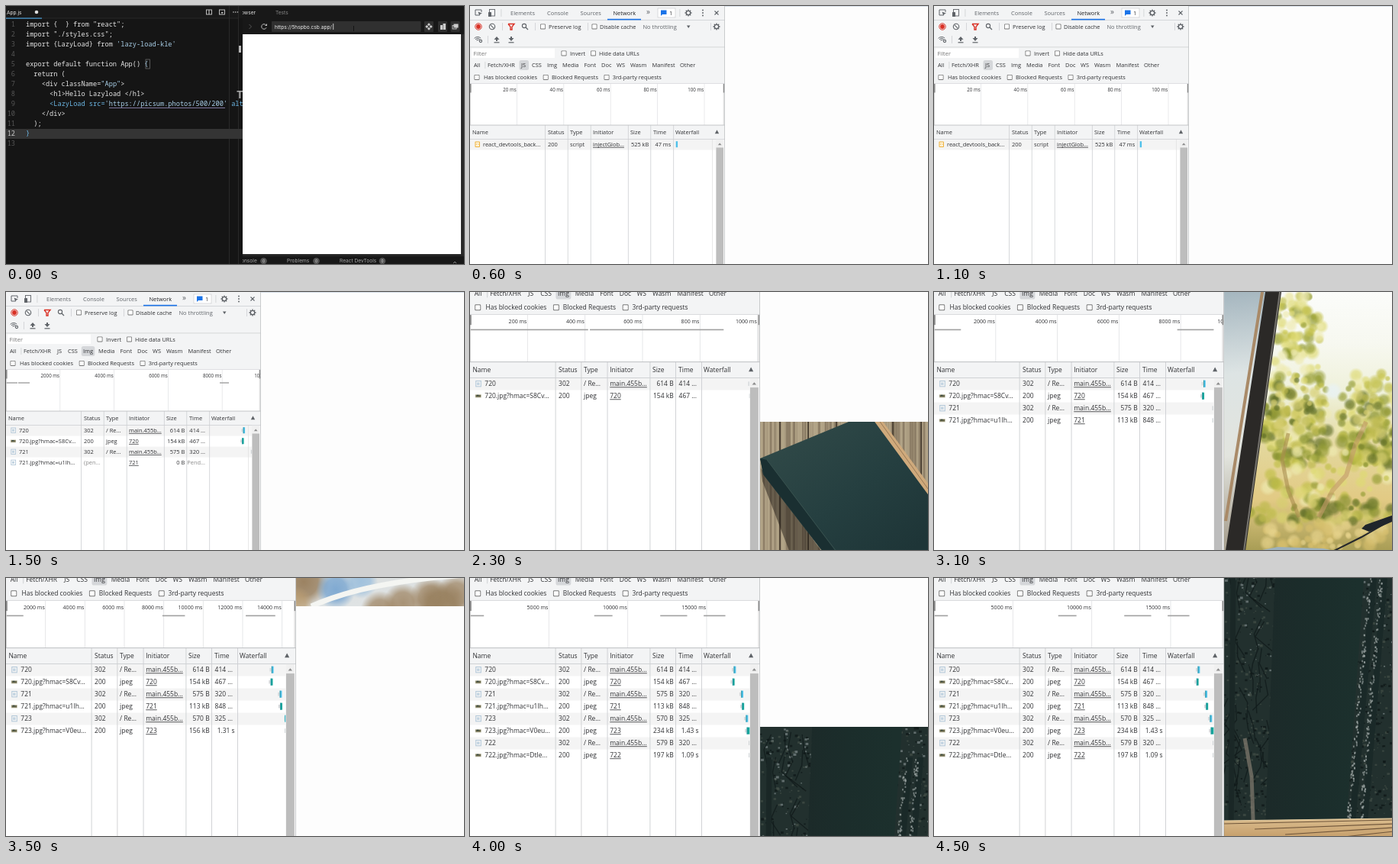
An HTML page with a canvas for the animation above (4600 ms loop, 600 px wide and 338 px high).

```html
<!DOCTYPE html>
<html lang="en">
<head>
<meta charset="utf-8">
<title>Lazy loading demo</title>
<style>
html, body { margin: 0; width: 100%; height: 100%; overflow: hidden; background: #fff; }
canvas { display: block; width: 600px; height: 338px; }
</style>
</head>
<body>
<canvas id="c" width="600" height="338"></canvas>
<script>
const ctx = document.getElementById('c').getContext('2d');
const LOOP = 4600, STEP = 100, W = 600, H = 338;
const UI = '7.45px "Open Sans", "Noto Sans", sans-serif';
const RULER = '6.2px "Open Sans", "Noto Sans", sans-serif';
const MONO = '8.64px "Noto Sans Mono", "DejaVu Sans Mono", monospace';
const SANS = '6.6px Inter, Roboto, sans-serif';

// ---------- helpers ----------
function rect(x, y, w, h, color) {
  ctx.fillStyle = color;
  ctx.fillRect(x, y, w, h);
}
function round(x, y, w, h, r, color) {
  ctx.fillStyle = color;
  ctx.beginPath();
  ctx.roundRect(x, y, w, h, r);
  ctx.fill();
}
function line(pts, color, width = 1) {
  ctx.strokeStyle = color;
  ctx.lineWidth = width;
  ctx.beginPath();
  for (let i = 0; i < pts.length; i += 2) ctx.lineTo(pts[i], pts[i + 1]);
  ctx.stroke();
}
function poly(pts, color) {
  ctx.fillStyle = color;
  ctx.beginPath();
  for (let i = 0; i < pts.length; i += 2) ctx.lineTo(pts[i], pts[i + 1]);
  ctx.fill();
}
function ring(x, y, r, color, width = 1) {
  ctx.strokeStyle = color;
  ctx.lineWidth = width;
  ctx.beginPath();
  ctx.arc(x, y, r, 0, 7);
  ctx.stroke();
}
function disc(x, y, r, color) {
  ctx.fillStyle = color;
  ctx.beginPath();
  ctx.arc(x, y, r, 0, 7);
  ctx.fill();
}
function box(x, y, w, h, color, width = 0.9) {
  ctx.strokeStyle = color;
  ctx.lineWidth = width;
  ctx.strokeRect(x, y, w, h);
}
// y is the middle of the capitals
function text(s, x, y, color = '#303134', font = UI, align = 'left') {
  ctx.font = font;
  ctx.textAlign = align;
  ctx.fillStyle = color;
  ctx.fillText(s, x, y + 2.7);
  return ctx.measureText(s).width;
}
function blob(x, y, r, rgb, a) {
  const g = ctx.createRadialGradient(x, y, 0, x, y, r);
  g.addColorStop(0, `rgba(${rgb},${a})`);
  g.addColorStop(0.55, `rgba(${rgb},${a * 0.85})`);
  g.addColorStop(1, `rgba(${rgb},0)`);
  ctx.fillStyle = g;
  ctx.fillRect(x - r, y - r, 2 * r, 2 * r);
}
function fade(x0, y0, x1, y1, ...colors) {
  const g = ctx.createLinearGradient(x0, y0, x1, y1);
  colors.forEach((c, i) => g.addColorStop(i / (colors.length - 1), c));
  return g;
}
function seeded(n) {
  return () => (n = (n * 16807) % 2147483647) / 2147483647;
}
function track(keys, t) {
  let i = 0;
  while (i < keys.length - 2 && t > keys[i + 1][0]) i++;
  const [t0, a] = keys[i], [t1, b] = keys[i + 1];
  const k = Math.min(1, Math.max(0, (t - t0) / (t1 - t0)));
  return a + (b - a) * k;
}
function clipped(x, y, w, h, draw) {
  ctx.save();
  ctx.beginPath();
  ctx.rect(x, y, w, h);
  ctx.clip();
  draw();
  ctx.restore();
}

// ---------- code editor ----------
const WHITE = '#e6e6e6', BLUE = '#6cb8e6', PALE = '#a9cfe8';
const CODE = [
  [0, 'import {  } from "react";', WHITE],
  [0, 'import "./styles.css";', WHITE],
  [0, 'import {LazyLoad} from ', WHITE, "'lazy-load-kle'", PALE],
  [0, ''],
  [0, 'export default function App() ', WHITE, '{', PALE],
  [2, 'return (', WHITE],
  [4, '<div className=', WHITE, '"App"', PALE, '>', WHITE],
  [6, '<h1>Hello Lazyload </h1>', WHITE],
  [6, '<LazyLoad src=', BLUE, "'https://picsum.photos/500/200'", PALE, ' alt=', BLUE],
  [4, '</div>', WHITE],
  [2, ');', WHITE],
  [0, '}', BLUE],
  [0, '']
];
function editor() {
  rect(0, 0, W, H, '#151515');
  rect(0, 0, 310, 16, '#191919');
  rect(0, 15.5, 305, 1, '#292929');
  rect(0, 15.5, 47, 1.2, '#4a9fd8');
  text('App.js', 1, 8, WHITE, SANS);
  disc(40, 8, 2.3, '#ddd');
  rect(292, 0, 1, H, '#292929');
  rect(304, 0, 1, H, '#292929');
  rect(0, 161, 310, 13, '#343434');
  box(183, 70, 5.5, 12, '#777', 0.7);
  clipped(0, 16, 310, H, () => {
    CODE.forEach((row, i) => {
      const y = 24 + i * 13.05;
      text(i + 1, 12, y, i === 11 ? '#ccc' : '#555', MONO, 'right');
      let x = 26 + row[0] * 5.184;
      for (let k = 1; k < row.length; k += 2) x += text(row[k], x, y, row[k + 1], MONO);
    });
    rect(135, 133, 152, 0.8, '#9a91c4');
  });
  box(262.5, 5, 7, 6, '#ccc');
  line([266, 5, 266, 11], '#ccc');
  box(279.5, 5, 7, 6, '#ccc');
  poly([281.5, 8, 285, 8, 283, 10], '#ccc');
  for (let i = 0; i < 3; i++) disc(298 + i * 2.7, 8, 0.8, '#ccc');
  round(305, 52, 3, 9, 0, '#b8b8b8');
  text('T', 302, 118, '#aaa', 'bold 13px Inter, sans-serif');

  rect(310, 0, 290, H, '#181818');
  clipped(310, 0, 290, H, () => {
    text('Browser', 327, 8, WHITE, SANS, 'right');
    text('onsole', 308, 333.5, '#aaa', SANS);
  });
  text('Tests', 353, 8, '#888', SANS);
  line([318.5, 24, 321.5, 27, 318.5, 30], '#555');
  ctx.strokeStyle = '#bbb';
  ctx.beginPath();
  ctx.arc(338, 27, 3.3, 0.4, 5.5);
  ctx.stroke();
  poly([339, 26, 342, 26, 342, 23], '#bbb');
  round(348, 20, 195.5, 14, 1, '#303030');
  text('https://5hspbo.csb.app/', 352, 27, '#f0f0f0', SANS);
  rect(428.4, 23, 0.8, 8, '#eee');
  line([455.5, 26, 455.5, 33], '#111', 0.9);
  [554, 572, 588.5].forEach(x => round(x - 6, 20, 12, 14, 1, '#303030'));
  [[0, -2.7], [0, 2.7], [-2.7, 0], [2.7, 0]].forEach(([x, y]) => {
    const a = 554 + x, b = 27 + y;
    poly([a, b - 2, a + 2, b, a, b + 2, a - 2, b], '#ccc');
  });
  rect(569, 25, 3, 6, '#ccc');
  rect(572.5, 23, 3.5, 8, '#ccc');
  rect(586.5, 23.5, 6, 5, '#ccc');
  box(585, 25.5, 5, 4.5, '#ccc');
  rect(310, 37, 286, 288, '#fff');
  rect(596, 37, 4, 288, '#2a2a2a');
  rect(310, 325, 290, 3, '#262626');
  text('Problems', 368, 333.5, '#aaa', SANS);
  text('React DevTools', 437, 333.5, '#aaa', SANS);
  [337.5, 406.5, 493].forEach(x => {
    disc(x, 334, 4.3, '#555');
    text('0', x, 333.7, '#ddd', '5px Inter, sans-serif', 'center');
  });
  line([586, 337, 588, 335, 590, 337], '#aaa', 0.8);
}

// ---------- photos, local to their top left corner ----------
const PHOTO_H = 440;
function book(w) {
  const rnd = seeded(11);
  rect(0, 0, w, PHOTO_H, '#a5967c');
  for (let x = -20; x < w; x += 3) {
    rect(x, 0, 1 + rnd() * 2, PHOTO_H, rnd() < 0.5 ? 'rgba(75,62,45,.28)' : 'rgba(220,205,170,.25)');
  }
  for (let x = 25; x < w; x += 37) rect(x, 0, 2, PHOTO_H, '#4d4234');
  poly([1, 61, 20, 85, 90, 183, 215, PHOTO_H, 50, 200, 3, 78], 'rgba(35,28,22,.5)');
  poly([150, 0, 161, 0, 250, 122, 320, 220, 300, 240], '#cfaa7c');
  line([157, 0, 250, 130], '#8b6c4c', 0.8);
  poly([0, 48, 116, 0, 150, 0, 222, 98, 300, 205, 120, 330, 88, 178, 4, 69],
    fade(40, 20, 170, 190, '#2f4847', '#253f40', '#1e3537'));
  poly([0, 48, 9, 50, 105, 178, 84, 172, 4, 69], '#1a2f31');
  line([9, 50, 106, 178], '#38514e', 1);
}
function windscreen(w) {
  const rnd = seeded(5);
  const leaves = (n, x, y, rx, ry, tones) => {
    for (let i = 0; i < n; i++) {
      const a = rnd() * 6.3, d = Math.sqrt(rnd());
      blob(x + Math.cos(a) * rx * d, y + Math.sin(a) * ry * d, 4 + rnd() * 7, tones[i % tones.length], 0.75);
    }
  };
  const LIT = ['222,218,116', '194,192,74', '150,158,54', '238,234,176'];
  const DEEP = ['134,144,48', '98,112,40', '190,186,78', '214,206,112'];
  ctx.fillStyle = fade(0, 50, 0, 390, '#fbfcfa', '#f7f8f0', '#eef0d8', '#e3d79c', '#e2ca84', '#a79c54');
  ctx.fillRect(0, 0, w, PHOTO_H);
  leaves(60, 100, 95, 34, 45, LIT);
  leaves(110, 85, 195, 52, 75, LIT);
  leaves(90, 92, 225, 45, 60, DEEP);
  leaves(120, 192, 215, 42, 65, LIT);
  leaves(70, 190, 235, 40, 55, DEEP);
  leaves(60, 130, 290, 90, 35, LIT);
  leaves(70, 130, 340, 100, 18, DEEP);
  leaves(45, 135, 370, 95, 16, ['232,212,140', '214,190,108']);
  blob(143, 180, 12, '232,242,246', 0.8);
  line([124, 345, 142, 310, 160, 290, 172, 250, 186, 220], 'rgba(196,156,104,.6)', 6);
  line([98, 345, 84, 310, 76, 270, 84, 235], 'rgba(168,140,78,.6)', 5);
  poly([0, 0, 66, 0, 60, 50, 5, 388, 0, PHOTO_H], fade(0, 50, 30, 370, '#a5b6bf', '#dde4e4', '#e2e4de', '#aaa394'));
  line([50, 50, 2, 350], '#a98a68', 4);
  poly([70, 0, 80, 0, 75, 50, 28, 388, 24, PHOTO_H, 0, PHOTO_H, 2, 388, 54, 50], '#2b2927');
  line([73, 50, 26, 388], '#75736d', 2);
  poly([40, 390, 70, 384, 130, 386, 150, 390], '#9db1bc');
  line([142, 390, 180, 371, 222, 347], '#24272b', 2);
  poly([180, 360, 185, 355, 222, 342, 222, 350, 190, 364], '#20252b');
}
function chrome(w) {
  ctx.fillStyle = fade(0, 0, 0, PHOTO_H, '#b9c8d2', '#6f8ca4', '#d6d8d6', '#dfe3e4');
  ctx.fillRect(0, 0, w, PHOTO_H);
  blob(10, 408, 34, '148,120,84', 0.9);
  blob(0, 436, 22, '186,156,112', 0.8);
  blob(52, 418, 26, '118,164,208', 0.9);
  blob(85, 408, 22, '146,186,220', 0.8);
  [[110, 446], [140, 436], [175, 428], [210, 424]].forEach(([x, y]) => blob(x, y, 26, '158,132,98', 0.85));
  blob(190, 440, 34, '150,126,92', 0.9);
  ctx.beginPath();
  ctx.moveTo(20, 440);
  ctx.quadraticCurveTo(90, 408, 222, 399);
  ctx.strokeStyle = '#f4f5f2';
  ctx.lineWidth = 7;
  ctx.stroke();
}
function forest(w) {
  const rnd = seeded(23);
  rect(0, 0, w, PHOTO_H, '#22302e');
  for (let i = 0; i < 1500; i++) {
    const x = rnd() * w, y = rnd() * 350, size = 1 + rnd() * 3;
    const sky = rnd() < 0.5 - y / 500;
    rect(x, y, size, size * 0.8, sky ? 'rgba(138,150,152,.6)' : ['rgba(14,22,22,.7)', 'rgba(72,84,76,.6)'][i % 2]);
  }
  for (let i = 0; i < 40; i++) {
    const x = rnd() * 75, y = rnd() * 300;
    line([x, y, x + 12 - rnd() * 24, y + 20, x + 18 - rnd() * 36, y + 40], 'rgba(18,27,27,.8)', 1.4);
  }
  line([12, 40, 9, 365], '#1a2726', 7);
  line([27, 250, 36, 300, 38, 358], 'rgba(132,124,112,.7)', 5);
  poly([68, 0, 186, 0, 160, 365, 54, 365], fade(55, 0, 175, 0, '#1c2a29', '#1b2d2b', '#1c302d'));
  [[188, 160], [202, 176]].forEach(([top, foot]) => {
    line([top + 8, 40, foot + 8, 360], '#1a2928', 8);
    for (let k = 0; k < 130; k++) {
      const p = rnd();
      rect(top + (foot - top) * p + rnd() * 5, 40 + p * 315, 1.8, 2.5, 'rgba(172,180,178,.6)');
    }
  });
  poly([0, 358, 222, 355, 222, PHOTO_H, 0, PHOTO_H], fade(0, 356, 0, 382, '#d9bb8c', '#c49c68'));
  [0, 1, 2, 3].forEach(i => line([i * 40, 362 + i * 7, 222, 357 + i * 5], '#6f553a', 1.1));
  line([0, 358, 222, 355], '#e6cfa4', 1);
}
const PHOTOS = [book, windscreen, chrome, forest];
const SCROLL = [[1700, -338], [2300, -170], [2700, 470], [3100, 890], [3500, 2083],
  [3800, 2150], [4200, 2500], [4500, 2560]];

function page(left, scroll) {
  rect(left, 0, W - left, H, '#fdfdfd');
  PHOTOS.forEach((draw, i) => {
    const y = i * 840 - scroll;
    if (y > H || y + PHOTO_H < 0) return;
    clipped(left, y, W - left, PHOTO_H, () => {
      ctx.translate(left, y);
      draw(W - left);
    });
  });
}

// ---------- network panel ----------
const SCRIPT = [['react_devtools_back...', '200', 'script', 'injectGlob...', '525 kB', '47 ms']];
function redirect(id, size, time) {
  return [id, '302', '/ Re...', 'main.455b...', size, time];
}
function picture(id, hash, size, time) {
  return [`${id}.jpg?hmac=${hash}...`, '200', 'jpeg', id, size, time];
}
const IMAGES = [
  redirect('720', '614 B', '414 ...'), picture('720', 'S8Cv', '154 kB', '467 ...'),
  redirect('721', '575 B', '320 ...'), picture('721', 'u1Ih', '113 kB', '848 ...'),
  redirect('723', '570 B', '325 ...'), picture('723', 'V0eu', '156 kB', '1.31 s'),
  redirect('722', '579 B', '320 ...'), picture('722', 'Dtle', '197 kB', '1.09 s')
];
const PENDING = ['721.jpg?hmac=u1Ih...', '(pen...', '', '721', '0 B', 'Pend...'];
const FINAL = IMAGES.slice();
FINAL[5] = picture('723', 'V0eu', '234 kB', '1.43 s');

// from: start time, tick: ms per mark, gap: px per mark, bars: overview, falls: waterfall x
const FIRST = { rows: IMAGES.slice(0, 2), tick: 200, gap: 66.2, bars: [[0, 136], [138, 292]], falls: [321, 322] };
const WAIT = { rows: [...IMAGES.slice(0, 3), PENDING], tick: 2000, gap: 70.8,
  bars: [[0, 15], [16, 31], [280, 292]], falls: [311, 309.5, 321.5] };
const STATES = [
  { from: 0, rows: SCRIPT, tick: 20, gap: 61.4, bars: [], falls: [270], js: true },
  { from: 1300, ...FIRST },
  { from: 1400, ...WAIT },
  { from: 1700, ...FIRST },
  { from: 2700, ...WAIT },
  { from: 2900, rows: IMAGES.slice(0, 4), tick: 2000, gap: 71, bars: [[0, 31], [280, 322]],
    falls: [310.5, 309, 321, 321] },
  { from: 3400, rows: IMAGES.slice(0, 6), tick: 2000, gap: 45.4, bars: [[0, 20], [180, 206], [276, 310]],
    falls: [306, 305, 315.5, 316, 321, 321.5] },
  { from: 4000, rows: FINAL, tick: 5000, gap: 90.8, bars: [[0, 16], [143, 164], [219, 250], [269, 294]],
    falls: [304, 302.5, 312.5, 313.5, 318, 319, 321.5, 321.5] }
];
const TYPES = [['All', 5], ['Fetch/XHR', 23], ['JS', 67], ['CSS', 81], ['Img', 101], ['Media', 121],
  ['Font', 149.5], ['Doc', 172], ['WS', 192], ['Wasm', 210], ['Manifest', 238.5], ['Other', 275]];
const GRAY = '#5f6368', RULE = '#cdcfd2';

function check(x, y, label, at) {
  round(x, y - 3.6, 7, 7, 1.2, '#777');
  round(x + 0.8, y - 2.8, 5.4, 5.4, 0.7, '#fff');
  text(label, at, y);
}
function gear(x, y) {
  ring(x, y, 2.7, GRAY, 1.3);
  for (let a = 0; a < 8; a++) {
    const c = Math.cos(a * Math.PI / 4), s = Math.sin(a * Math.PI / 4);
    line([x + c * 3, y + s * 3, x + c * 4.5, y + s * 4.5], GRAY, 1.3);
  }
}
function toolbar(js) {
  rect(0, 0, 334, 101.5, '#f3f4f5');
  [18, 53.5, 101].forEach(y => rect(0, y, 334, 0.8, RULE));
  // tabs
  line([12, 12, 7, 12, 7, 5, 15, 5, 15, 8], GRAY);
  poly([10.5, 7.5, 16, 9.8, 13.5, 10.5, 12.5, 13], GRAY);
  box(25.5, 4.5, 7, 8.5, GRAY);
  round(24, 8, 4, 6, 0.5, GRAY);
  rect(40.5, 4, 0.8, 10, RULE);
  [['Elements', 53], ['Console', 101], ['Sources', 144.5], ['Network', 187.5]]
    .forEach(([s, x]) => text(s, x, 9, x > 180 ? '#202124' : GRAY));
  rect(180, 16.8, 44, 1.6, '#1a73e8');
  text('»', 231, 8.5, GRAY, '10px "Open Sans", sans-serif');
  round(246, 3, 23, 12, 2, '#fff');
  box(246, 3, 23, 12, RULE, 0.7);
  poly([250, 5.5, 257.5, 5.5, 257.5, 11, 252, 11, 250, 13], '#1a73e8');
  text('1', 261, 9);
  rect(274.5, 4, 0.8, 10, RULE);
  gear(286, 9);
  [5.5, 9, 12.5].forEach(y => disc(305, y, 0.95, GRAY));
  line([320.5, 6.5, 325.5, 11.5], GRAY, 1.1);
  line([325.5, 6.5, 320.5, 11.5], GRAY, 1.1);
  // record row
  ring(11, 27, 4.2, '#d93025');
  disc(11, 27, 2.9, '#d93025');
  ring(29, 27, 3.7, GRAY, 1.1);
  line([26.4, 24.4, 31.6, 29.6], GRAY, 1.1);
  [42, 85, 154, 315].forEach(x => rect(x, 22, 0.8, 10, RULE));
  line([50, 23.5, 58, 23.5, 55, 27.2, 55, 31, 53, 31, 53, 27.2, 50, 23.5], '#d93025', 1.4);
  ring(71, 26, 2.6, GRAY, 1.1);
  line([73, 28, 76, 31], GRAY, 1.2);
  check(92, 27, 'Preserve log', 103);
  check(159.5, 27, 'Disable cache', 170);
  text('No throttling', 226.5, 27, GRAY);
  poly([284, 25.5, 288.5, 25.5, 286.2, 29], GRAY);
  gear(323, 27);
  // conditions row
  [2, 4, 6].forEach(r => {
    ctx.strokeStyle = GRAY;
    ctx.lineWidth = 1;
    ctx.beginPath();
    ctx.arc(10, 46.5, r, 3.9, 5.5);
    ctx.stroke();
  });
  ring(14, 46, 1.6, GRAY, 1.1);
  rect(23, 39, 0.8, 10, RULE);
  poly([35, 40, 38.5, 44, 36, 44, 36, 46, 34, 46, 34, 44, 31.5, 44], GRAY);
  poly([54, 46, 57.5, 42, 55, 42, 55, 40, 53, 40, 53, 42, 50.5, 42], GRAY);
  [35, 54].forEach(x => rect(x - 3.5, 47.2, 7, 1.2, GRAY));
  // filter rows
  rect(2, 55.5, 109, 12.5, '#fff');
  text('Filter', 4.5, 62, '#757575');
  check(119.5, 62, 'Invert', 131);
  check(158, 62, 'Hide data URLs', 169);
  if (js) round(64.5, 71, 12.5, 13, 2.5, '#d5d7da');
  else round(98.8, 71, 17.5, 13, 2.5, '#d5d7da');
  TYPES.forEach(([s, x]) => text(s, x, 77.5));
  rect(19.5, 73, 0.8, 9, RULE);
  check(5.5, 93.5, 'Has blocked cookies', 18);
  check(95.7, 93.5, 'Blocked Requests', 107);
  check(175.5, 93.5, '3rd-party requests', 186.7);
}
function overview(s) {
  rect(0, 101.8, 334, 54, '#fff');
  for (let i = 1; i * s.gap < 360; i++) {
    const x = i * s.gap;
    rect(x - 0.4, 102, 0.8, 54, '#e3e4e6');
    text(i * s.tick + ' ms', x - 0.8, 108.8, '#303134', RULER, 'right');
  }
  s.bars.forEach(([a, b]) => rect(a, 118.3, b - a, 1.4, '#a0a0a0'));
  [0, 331.8].forEach(x => {
    rect(x, 102, 0.8, 54, '#ccc');
    rect(x, 102, 1.6, 11.5, '#8a8a8a');
  });
}
function icon(type, y) {
  if (type === 'jpeg') {
    rect(6, y - 1.9, 7, 4, '#d6d4c4');
    rect(6.5, y - 1.2, 6, 2.5, '#6c6a4c');
    rect(8, y - 1.2, 2, 1.2, '#2e4442');
  } else if (type === 'script') {
    round(6.5, y - 3.7, 6.5, 7.5, 1, '#eeb13b');
    rect(7.5, y - 2.7, 4.5, 5.5, '#fff6e0');
    line([9, y - 1, 8.2, y, 9, y + 1], '#eeb13b', 0.7);
    line([10.5, y - 1, 11.3, y, 10.5, y + 1], '#eeb13b', 0.7);
  } else {
    box(6.8, y - 3.2, 5.8, 6.4, '#b3c8d9', 0.9);
    rect(8, y - 1.5, 3, 3, '#c3d4e1');
  }
}
function table(s, zoomed) {
  rect(0, 156, 334, 220, '#fff');
  rect(0, 156, 334, 18.5, '#f3f4f5');
  s.rows.forEach((r, i) => { if (i % 2 === 0) rect(0, 174.5 + i * 14.05, 322, 14.05, '#f4f4f4'); });
  [98.5, 128.2, 158.2, 207.3, 236.8, 266.7].forEach(x => rect(x - 0.4, 156, 0.8, 220, RULE));
  if (!zoomed) rect(317, 174, 0.7, 200, '#dedede');
  rect(0, 155.6, 334, 0.9, '#bfc1c4');
  rect(0, 174, 334, 0.8, RULE);
  [['Name', 3], ['Status', 102], ['Type', 131], ['Initiator', 161], ['Size', 210], ['Time', 240], ['Waterfall', 269]]
    .forEach(([h, x]) => text(h, x, 165));
  poly([323.5, 162.2, 326.2, 167.2, 320.8, 167.2], GRAY);
  s.rows.forEach(([name, status, type, from, size, time], i) => {
    const y = 181.2 + i * 14.05, dim = status[0] === '(';
    icon(name.includes('.jpg') && !dim ? 'jpeg' : type, y);
    text(name, 17, y);
    text(status, 102, y, dim ? '#888' : undefined);
    text(type, 131, y);
    const w = text(from, 161, y);
    rect(161, y + 3.7, w, 0.7, '#303134');
    text(size, 234.3, y, undefined, UI, 'right');
    text(time, time.endsWith('s') ? 263.3 : 261, y, dim ? '#888' : undefined, UI, 'right');
    const x = s.falls[i];
    if (x === undefined) return;
    if (x >= 321) {
      rect(x - 0.6, y - 2.5, 0.9, 5, '#c8cdd0');
      if (i === 4) rect(x - 0.2, y - 4, 1.4, 8, '#38b5c4');
      return;
    }
    if (!s.js) rect(x - 2.4, y - 2, 1.7, 4, '#d3d7da');
    rect(x - 0.3, y - 4, i === 5 ? 3.6 : 2.4, 8, type === 'jpeg' ? '#16a79b' : '#4fc1ea');
    if (!s.js) rect(x - 0.3, y - 4, 0.8, 8, '#238f9c');
  });
  rect(322, 174.8, 10.5, 200, '#f0f0f0');
  rect(322.5, 185.5, 9.5, 190, '#bdbdbd');
  poly([327.2, 179.5, 329.6, 182.3, 324.8, 182.3], '#8a8a8a');
}

function devtools(t) {
  const s = STATES.findLast(x => t >= x.from);
  const k = track([[1700, 0], [2200, 1]], t), e = k * k * (3 - 2 * k);
  const zoom = 1 + 0.138 * e;
  const left = 334 * zoom;
  page(left, t < 1700 ? -H : track(SCROLL, t));
  if (t < 1700) rect(left, 0, W - left, 0.8, '#cfd9e4');
  clipped(0, 0, left, H, () => {
    ctx.translate(0, -86 * e);
    ctx.scale(zoom, zoom);
    toolbar(s.js);
    overview(s);
    table(s, e > 0.5);
    rect(333.2, 0, 0.8, 390, '#bfc1c4');
  });
}

let last = -1;
function tick(now) {
  const t = Math.floor((now % LOOP) / STEP) * STEP;
  if (t !== last) {
    last = t;
    ctx.clearRect(0, 0, W, H);
    if (t < 300) editor();
    else devtools(t);
  }
  requestAnimationFrame(tick);
}
tick(0);
</script>
</body>
</html>
```
